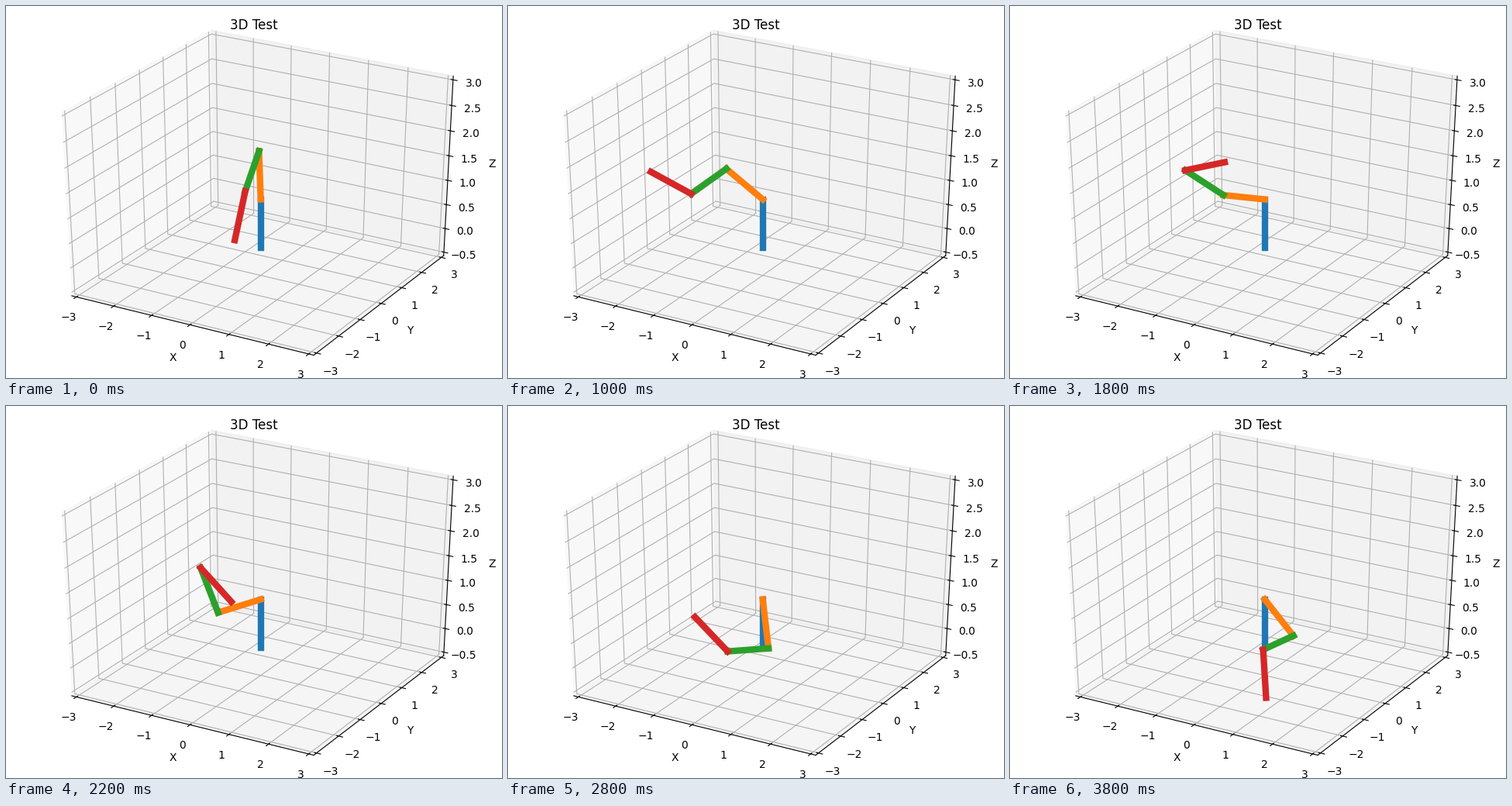
Recreate the animation shown at these times as a matplotlib script. Size 640 by 480 pixels, loop 4 s.

```python
import numpy as np
import matplotlib.pyplot as plt
from matplotlib.animation import FuncAnimation

FRAMES, INTERVAL = 20, 200

# step: base yaw and the pitch of the three upper links, in degrees
KEY_POSES = {
    0: (99, 96, 212, 230),
    3: (-11, 227, 151, 181),
    7: (45, 66, 278, 135),
    9: (9, 182, 157, 16),
    12: (59, 196, 90, -78),
    14: (12, 278, 190, -219),
    19: (-9, 326, 209, -85),
}


def arm(step):
    """Joint positions (x, y, z): unit links in one upright plane."""
    tracks = zip(*KEY_POSES.values())
    yaw, *pitch = (np.radians(np.interp(step, list(KEY_POSES), track))
                   for track in tracks)
    pitch = np.array([np.pi / 2, *pitch])  # the first link stands upright
    reach = np.append(0, np.cumsum(np.cos(pitch)))
    height = np.append(0, np.cumsum(np.sin(pitch)))
    return np.array([reach * np.cos(yaw), reach * np.sin(yaw), height])


fig = plt.figure(figsize=(6.4, 4.8), dpi=100)
ax = fig.add_axes([0, 0, 1, 1], projection="3d")
ax.apply_aspect = lambda position=None: None  # fill the whole figure
ax.set_box_aspect((1, 1, 1), zoom=np.sqrt(3) / 1.8294640721620434)
ax.view_init(elev=30, azim=-60)
ax.set_title("3D Test", y=1.0)

for name, lo, hi, gap in (("x", -3, 3, 1), ("y", -3, 3, 1), ("z", -0.5, 3, 0.5)):
    pad = (hi - lo) / 48
    ticks = np.arange(lo, hi + gap / 2, gap)
    if gap == 1:
        ticks = ticks.astype(int)
    ax.set(**{f"{name}ticks": ticks,
              f"{name}lim": (lo - pad, hi + pad),
              f"{name}label": name.upper()})

links = [ax.plot([0, 0], [0, 0], [0, 1], color=f"C{i}", lw=6)[0]
         for i in range(4)]


def update(step):
    points = arm(step)
    for i, link in enumerate(links):
        link.set_data_3d(*points[:, i:i + 2])
    return links


anim = FuncAnimation(fig, update, frames=FRAMES, interval=INTERVAL,
                     init_func=lambda: update(0), repeat=True, repeat_delay=0)
plt.show()
```
